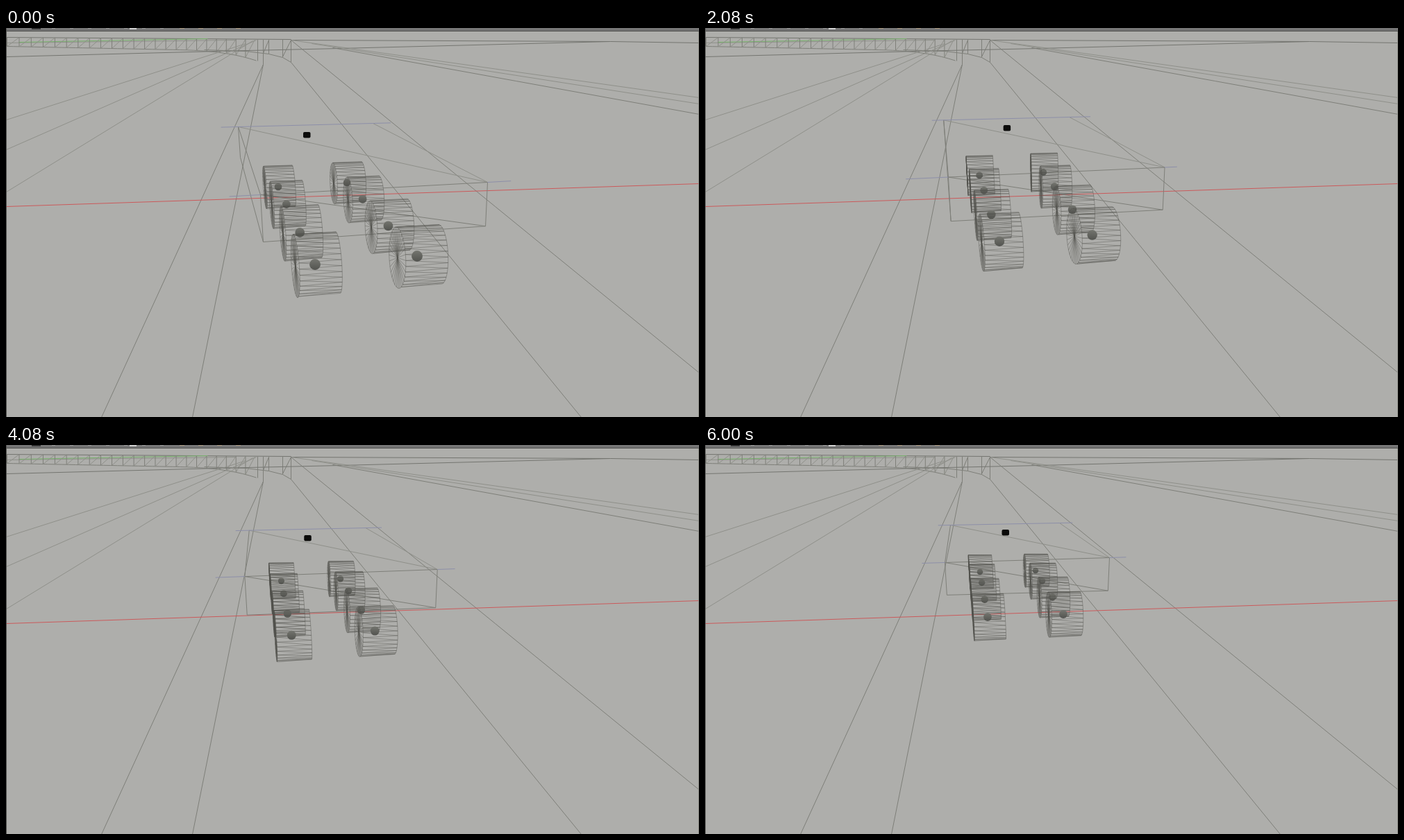
Recreate the animation shown at these times as an HTML page with a canvas. Size 998 px wide and 561 px high, loop 6080 ms.

```html
<!DOCTYPE html>
<html lang="en">
<head>
<meta charset="utf-8">
<title>Wireframe vehicle</title>
<style>
html, body { margin: 0; width: 100%; height: 100%; overflow: hidden; background: #aeaeab; }
canvas { display: block; }
</style>
</head>
<body>
<canvas id="stage" width="998" height="561"></canvas>
<script>
const LOOP = 6080, FPS = 12, LAST = 72, SEGMENTS = 32;
const GROUND = '#aeaeab', DARK = '#747570', GREY = '#7e7f79', PALE = '#8f908a', BLUE = '#8d8fa9';

const ctx = document.getElementById('stage').getContext('2d');

function line(color, ...points) {
  ctx.strokeStyle = color;
  ctx.lineWidth = 1;
  ctx.beginPath();
  points.forEach(([x, y]) => ctx.lineTo(x + .5, y + .5));
  ctx.stroke();
}

function rect(color, x, y, w, h) {
  ctx.fillStyle = color;
  ctx.fillRect(x, y, w, h);
}

const lerp = (a, b, u) => a + (b - a) * u;
const cross = (a, b, c) => (b[0] - a[0]) * (c[1] - a[1]) - (b[1] - a[1]) * (c[0] - a[0]);

// The vehicle pulls away quickly, then recedes ever more slowly
const distance = n => 120 * (1 - Math.exp(-n / 120)) - 5 * (1 - Math.exp(-n / 5));
// A short turn of the wheels, strongest at step 17
const steering = n => (n / 17 * Math.exp(1 - n / 17)) ** 2;

// Moves a point between two places; bend is the sideways swing on the way
const mover = p => (from, to, bend) => [
  lerp(from[0], to[0], p) + bend * 4 * p * (1 - p),
  lerp(from[1], to[1], p)
];

function drawTrack() {
  const top = x => 13 + x * .008;
  const low = x => 26 + x * .02 + Math.max(0, (x - 230) / 132) ** 3 * 14;
  const rail = [];
  for (let x = 0; x <= 362; x += 10) rail.push([x, low(x)]);
  line(DARK, [0, 13], [410, 16]);
  line(PALE, [0, 21], [330, 17]);
  line('#78b56c', [18, 20], [290, 15]);
  line(GREY, ...rail);
  for (let x = 1, step = 17.5; x < 355; x += step, step -= .18) {
    line(GREY, [x, top(x)], [x, low(x)]);
    line(PALE, [x, low(x)], [x + step, top(x + step)]);
  }
  const curb = [[362, 47], [370, 52], [378, 37], [398, 42], [410, 49]];
  line(GREY, [285, 31], [345, 33], ...curb.slice(2));
  curb.forEach(([x, y]) => line(GREY, [x, 16], [x, y]));
  line(GREY, [370, 36], [378, 17]);
  line(GREY, [398, 41], [410, 17]);
}

function drawScene() {
  rect(GROUND, 0, 0, 998, 561);
  drawTrack();

  line(DARK, [0, 41], [305, 33], [480, 29], [870, 19]);
  line(DARK, [410, 17], [870, 19], [998, 21]);

  line(PALE, [345, 22], [0, 132]);
  line(PALE, [360, 17], [0, 175]);
  line(PALE, [355, 18], [0, 236]);
  line(PALE, [410, 17], [998, 100]);
  line(PALE, [440, 22], [998, 109]);
  line(GREY, [470, 28], [998, 124]);

  line(GREY, [137, 561], [370, 52], [268, 561]);
  line(GREY, [410, 49], [828, 561]);
  line(GREY, [410, 17], [998, 497]);
  line('#cb5a5b', [0, 257], [998, 224]);
}

function drawHeader() {
  rect('#757575', 0, 0, 998, 4);
  rect('#50504e', 0, 4, 998, 1);
  rect('#50504e', 0, 0, 1, 561);
  rect('#85857f', 997, 5, 1, 556);
  // Lower edges of the toolbar
  rect('#333', 37, 0, 13, 2);
  rect('#ccc', 178, 0, 10, 2);
  for (let x = 66; x < 230; x += 26) rect('#999', x, 0, 5, 1);
  for (let x = 250; x < 340; x += 27) rect('#a8967c', x, 0, 7, 1);
}

function drawBody(move, steer) {
  const a = move([334, 142], [353, 115], 2.6);
  const b = move([528, 137], [510, 112], 3);
  const c = move([693, 222], [582, 162], 9);
  const d = move([366, 240], [345, 169], -9.3);
  const w = c[0] - d[0], tilt = (d[1] - c[1]) / w;
  const e = [d[0] + w * .012, d[1] + w * (.186 + .4 * tilt)];
  const f = [c[0] - w * .009, c[1] + w * (.21 - .3 * tilt)];
  const g = [a[0] + 3, a[1] + w * .135];
  line(PALE, a, c, b);
  line(GREY, a, d, c, f, e, d, f);
  if (cross(a, d, e) > 0) line(GREY, a, g, e);

  // Axes stick out past the corners and shift with the steering
  const axis = (p, q, before, after) => {
    const slope = (q[1] - p[1]) / (q[0] - p[0]);
    line(BLUE, [p[0] - before, p[1] - before * slope], p);
    line(BLUE, q, [q[0] + after, q[1] + after * slope]);
  };
  line(BLUE, a, b);
  axis(a, b, w * .076 - 8 * steer, w * .078 + 7 * steer);
  axis(d, c, w * .137 + 22 * steer, w * .103 - 17 * steer);
}

function drawWheel(hub, axis, fwd, height) {
  const uy = -Math.sqrt(Math.max(1, height * height / 4 - fwd[1] * fwd[1]));
  const ux = -uy * (hub[0] - 520) * .00045;
  const end = (shift, size) => {
    const c = [hub[0] + axis[0] * shift, hub[1] + axis[1] * shift];
    const rim = Array.from({ length: SEGMENTS + 1 }, (_, i) => {
      const t = i / SEGMENTS * Math.PI * 2, s = Math.sin(t) * size, k = Math.cos(t) * size;
      return [c[0] + ux * k + fwd[0] * s, c[1] + uy * k + fwd[1] * s];
    });
    return { c, rim };
  };
  const left = end(-.192, 1), right = end(.225, .97);

  ctx.strokeStyle = 'rgba(80,81,75,.55)';
  ctx.lineWidth = .75;
  ctx.beginPath();
  for (let i = 0; i < SEGMENTS; i++) {
    const p = left.rim[i], q = left.rim[i + 1], s = right.rim[i], t = right.rim[i + 1];
    ctx.moveTo(...left.c);
    ctx.lineTo(...p);
    ctx.lineTo(...q);
    if (cross(p, s, t) > 0) {
      ctx.moveTo(...p);
      ctx.lineTo(...s);
      ctx.lineTo(...t);
      ctx.lineTo(...p);
    }
  }
  ctx.stroke();

  const r = axis[0] * .054;
  const shade = ctx.createLinearGradient(0, hub[1] - r, 0, hub[1] + r);
  shade.addColorStop(0, '#74756f');
  shade.addColorStop(1, '#52534f');
  ctx.fillStyle = shade;
  ctx.beginPath();
  ctx.arc(...hub, r, 0, Math.PI * 2);
  ctx.fill();
}

function drawWheels(move, steer) {
  const farL = move([392, 229], [396, 183], 1.9), nearL = move([445, 341], [407, 248], -8);
  const farR = move([491, 223], [476, 181], 1.7), nearR = move([592, 329], [516, 244], -7.7);
  const zFar = 1 / (farR[0] - farL[0]), zNear = 1 / (nearR[0] - nearL[0]);
  // Four axles, spaced in perspective; front and rear steer opposite ways
  for (const u of [0, .3, .68, 1]) {
    const z = lerp(zFar, zNear, u);
    const at = (p, q) => p.map((v, k) => lerp(zFar * v, zNear * q[k], u) / z);
    const turn = 1 + steer * (1.35 * u - .9);
    const scale = zFar * zNear / (z * z) / 12.5;
    const forward = (p, q) => [(q[0] - p[0]) * scale * turn, (q[1] - p[1]) * scale];
    const l = at(farL, nearL), r = at(farR, nearR), axis = [r[0] - l[0], r[1] - l[1]];
    drawWheel(l, axis, forward(farL, nearL), axis[0] * .622);
    drawWheel(r, axis, forward(farR, nearR), axis[0] * .602);
  }
}

function draw(n) {
  const move = mover(distance(n) / distance(LAST)), steer = steering(n);
  drawScene();
  drawBody(move, steer);
  drawWheels(move, steer);
  const [x, y] = move([433, 154], [432.5, 126], 2);
  ctx.fillStyle = '#0b0b0a';
  ctx.beginPath();
  ctx.roundRect(x - 5, y - 4, 10.5, 8.5, 2);
  ctx.fill();
  drawHeader();
}

function tick() {
  const t = performance.now() % LOOP;
  draw(Math.min(LAST, Math.floor((t + 5) * FPS / 1000)));
  requestAnimationFrame(tick);
}
tick();
</script>
</body>
</html>
```
